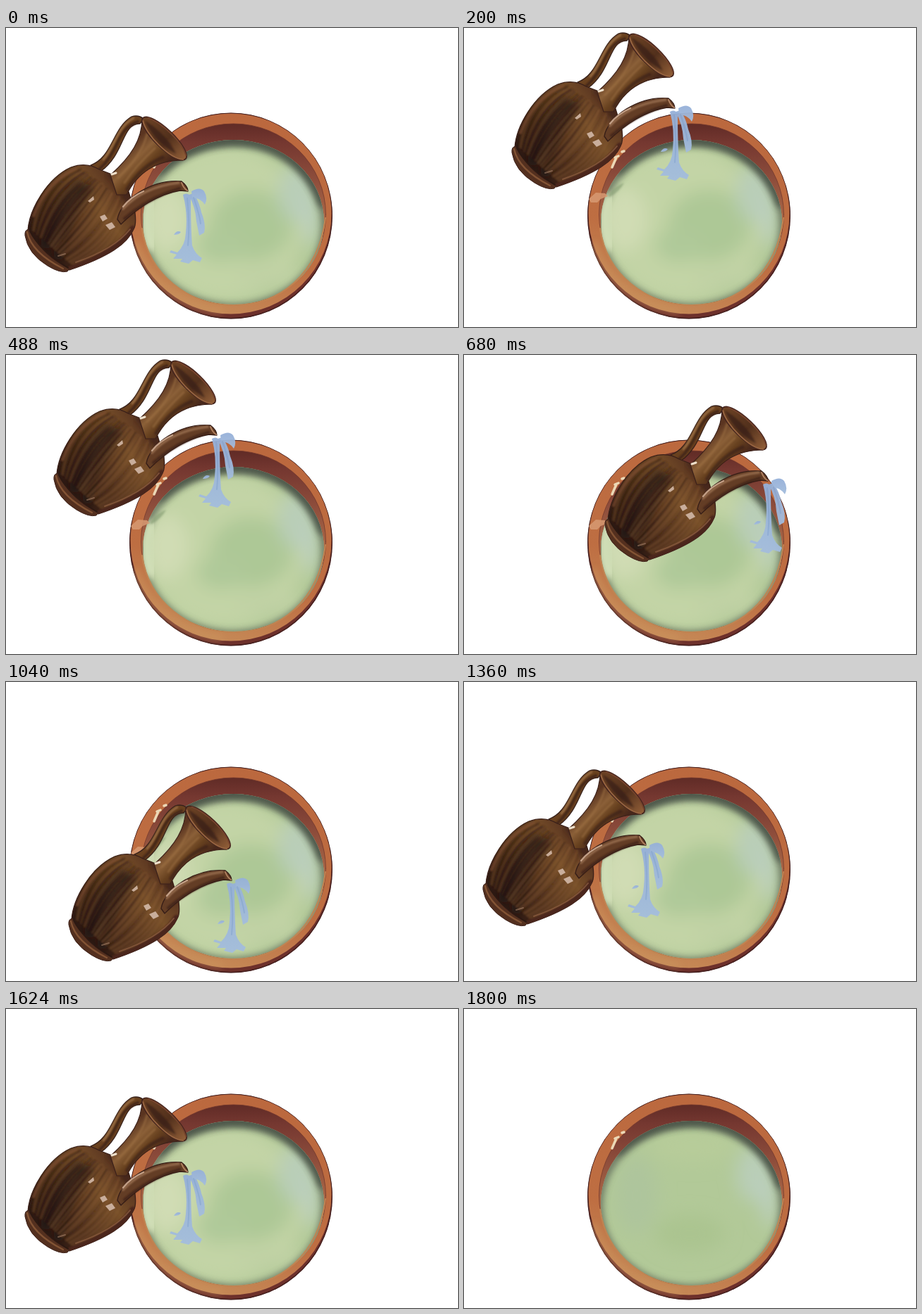
An HTML page that plays this animation: 641x425 px, repeating every 2.08 s.

```html
<!DOCTYPE html>
<html lang="en">
<head>
<meta charset="utf-8">
<title>Pouring jug</title>
<style>
  html, body { margin: 0; width: 100%; height: 100%; overflow: hidden; background: #fff; }
  svg { display: block; width: 641px; height: 425px; }
</style>
</head>
<body>
<svg viewBox="0 0 641 425" fill="none" stroke-linecap="round" stroke-linejoin="round">
  <defs>
    <filter id="soft" x="-50%" y="-50%" width="200%" height="200%"><feGaussianBlur stdDeviation="12"/></filter>
    <filter id="haze" x="-50%" y="-50%" width="200%" height="200%"><feGaussianBlur stdDeviation="5"/></filter>
    <filter id="smooth" x="-50%" y="-50%" width="200%" height="200%"><feGaussianBlur stdDeviation="1.2"/></filter>
    <linearGradient id="rim" x1=".65" y1="0" x2=".35" y2="1">
      <stop stop-color="#bb683e"/><stop offset=".65" stop-color="#be6e42"/><stop offset="1" stop-color="#c68b58"/>
    </linearGradient>
    <linearGradient id="wall" x1="0" y1="0" x2="0" y2="1">
      <stop stop-color="#602b26"/><stop offset=".1" stop-color="#743730"/><stop offset=".28" stop-color="#8a4a3a"/><stop offset=".55" stop-color="#ae6b48"/><stop offset="1" stop-color="#bc7d50"/>
    </linearGradient>
    <linearGradient id="glaze" gradientUnits="userSpaceOnUse" x1="45" y1="308" x2="165" y2="222">
      <stop stop-color="#2c1812"/><stop offset=".3" stop-color="#472a19"/><stop offset=".7" stop-color="#785029"/><stop offset="1" stop-color="#54301f"/>
    </linearGradient>
    <linearGradient id="neck" gradientUnits="userSpaceOnUse" x1="172" y1="172" x2="210" y2="210">
      <stop stop-color="#5a3420"/><stop offset=".35" stop-color="#8b6038"/><stop offset=".65" stop-color="#67411f"/><stop offset="1" stop-color="#47271b"/>
    </linearGradient>
    <linearGradient id="mouth" x1="0" y1="0" x2="1" y2="0">
      <stop stop-color="#6d4325"/><stop offset=".55" stop-color="#52301c"/><stop offset="1" stop-color="#936039"/>
    </linearGradient>
    <linearGradient id="water" x1="0" y1="0" x2="0" y2="1">
      <stop stop-color="#95b0d9"/><stop offset="1" stop-color="#a4bddd"/>
    </linearGradient>
    <clipPath id="bowlClip"><ellipse cx="319" cy="267" rx="144" ry="146.5"/></clipPath>
    <clipPath id="liquidClip"><ellipse cx="322.5" cy="276" rx="128.5" ry="117"/></clipPath>
    <path id="body" d="M31 288C33 257 59 213 92 198Q114 190 132 201L150 208L174 233L183 263Q185 279 181 286C172 307 146 325 90 344Q62 335 31 288Z"/>
    <clipPath id="bodyClip"><use href="#body"/></clipPath>
  </defs>

  <g clip-path="url(#bowlClip)">
    <ellipse cx="319" cy="267" rx="144" ry="146.5" fill="#6d302b" stroke="#45201f" stroke-width="3"/>
    <ellipse cx="319" cy="264" rx="142.5" ry="142.5" fill="url(#rim)"/>
    <ellipse cx="322.5" cy="265" rx="131" ry="129" fill="url(#wall)" stroke="#74392c" stroke-width=".8"/>
    <g clip-path="url(#liquidClip)">
      <rect x="190" y="155" width="270" height="245" fill="#b2c998"/>
      <g filter="url(#soft)">
        <g id="milky">
          <ellipse cx="310" cy="278" rx="114" ry="112" fill="#c3d4a6"/>
          <ellipse cx="226" cy="272" rx="34" ry="46" fill="#d0dcb4"/>
          <ellipse cx="348" cy="280" rx="58" ry="50" fill="#adc896"/>
          <ellipse cx="306" cy="309" rx="35" ry="24" fill="#afc999"/>
          <ellipse cx="374" cy="355" rx="50" ry="15" fill="#c0d1a4"/>
        </g>
        <g id="calm">
          <ellipse cx="245" cy="265" rx="30" ry="55" fill="#aec59c"/>
          <ellipse cx="325" cy="195" rx="62" ry="23" fill="#b7cc9a"/>
          <ellipse cx="320" cy="319" rx="50" ry="27" fill="#abc490"/>
        </g>
        <ellipse cx="412" cy="235" rx="26" ry="40" fill="#b9ceb8"/>
        <ellipse cx="432" cy="272" rx="9" ry="38" fill="#bdd0c4"/>
      </g>
      <ellipse cx="322" cy="280" rx="132" ry="119" stroke="#66715f" stroke-width="15" opacity=".85" filter="url(#haze)"/>
      <path d="M219 198C282 141 407 134 451 246" stroke="#414840" stroke-width="19" opacity=".75" filter="url(#haze)"/>
      <path id="paleEdge" d="M205 244Q193 275 206 308" stroke="#d1dfb7" stroke-width="17" filter="url(#haze)"/>
    </g>
    <path d="M193 285C202 350 258 394 323 394S443 350 453 270" stroke="#c18452" stroke-width="2"/>
    <path d="M184 308Q214 390 303 402" stroke="#cc9661" stroke-width="9" opacity=".55" filter="url(#haze)"/>
    <path d="M210 198L216 184M214 184L219 182M224 176L227 175" stroke="#ecd8b6" stroke-width="3.5"/>
    <g id="smudge">
      <path d="M177 243L187 234L200 235L204 239L194 243L189 248L180 248Z" fill="#d79b73" opacity=".85"/>
      <path d="M204 239Q211 226 227 220Q221 232 207 240Z" fill="#8aa178" opacity=".65" filter="url(#smooth)"/>
    </g>
  </g>

  <g id="jug">
    <g fill="url(#water)" opacity=".95">
      <path d="M251 237Q257 233 262 239Q262 283 264 309Q268 321 278 327L275 333L265 330L259 335L247 332L250 328L237 328L242 322L232 319L234 316L243 319Q254 309 255 291Q258 262 251 237Z"/>
      <path d="M259 237L266 235Q274 247 277 262Q284 279 281 291L274 295L270 275Q269 255 259 237Z"/>
      <path d="M263 232Q275 225 281 232Q287 242 282 251Q275 241 264 241Z"/>
      <path d="M238 294Q242 287 248 290Q246 294 238 294Z"/>
      <path d="M257 242Q261 281 258 309M266 241Q274 264 276 278" stroke="#7f9fd0" stroke-width="2" opacity=".5" fill="none"/>
    </g>

    <path d="M120 195C151 184 151 142 178 126Q188 123 195 129L190 136C164 135 169 179 134 204Z" fill="#69411f" stroke="#36201a" stroke-width="1.3"/>
    <path d="M132 201C161 176 155 145 187 133" stroke="#452719" stroke-width="4" filter="url(#smooth)"/>
    <path d="M138 187C155 168 158 140 181 128" stroke="#9c7147" stroke-width="2.5" filter="url(#smooth)"/>

    <use href="#body" fill="url(#glaze)" stroke="#3a2019" stroke-width="1.3"/>
    <g clip-path="url(#bodyClip)">
      <g id="grain" filter="url(#smooth)"></g>
      <path d="M92 343Q157 322 180 286" stroke="#4b271d" stroke-width="10" filter="url(#smooth)"/>
      <path d="M99 333Q154 314 176 286" stroke="#8b5d40" stroke-width="2" opacity=".75"/>
      <path d="M39 267Q57 218 99 200" stroke="#7e4e33" stroke-width="4" opacity=".65" filter="url(#smooth)"/>
      <path d="M150 207Q169 224 172 249" stroke="#351b14" stroke-width="13" opacity=".6" filter="url(#haze)"/>
    </g>

    <path d="M193 129C193 158 178 182 148 209L157 237L171 237C186 207 212 188 251 188Z" fill="url(#neck)" stroke="#3c211a" stroke-width="1.2"/>
    <path d="M200 151Q193 181 159 213M211 171Q184 196 168 220" stroke="#9c6f42" stroke-width="3" opacity=".55" filter="url(#smooth)"/>
    <path d="M222 184Q191 197 172 229" stroke="#361c15" stroke-width="5" opacity=".55" filter="url(#smooth)"/>
    <g transform="translate(224.5 157) rotate(44)">
      <ellipse rx="42" ry="13" fill="url(#mouth)" stroke="#44241d" stroke-width="1.8"/>
      <path d="M-38 1Q-5 -7 27 4Q-6 13 -38 1Z" fill="#341c14" opacity=".65" filter="url(#smooth)"/>
      <path d="M-39 3C-24 14 25 16 40 3" stroke="#986541" stroke-width="1.8"/>
      <path d="M-37 -5C-16 -14 22 -14 39 -4" stroke="#75432c" stroke-width="1.8"/>
    </g>
    <path d="M150 208L156 206" stroke="#eee0cc" stroke-width="3"/>

    <path d="M158 272C162 245 206 214 249 218Q258 225 258 232L247 231C216 236 186 256 163 279Z" fill="#633d25" stroke="#351d17" stroke-width="1.3"/>
    <path d="M168 271Q202 241 246 228" stroke="#3c2118" stroke-width="4" opacity=".75" filter="url(#smooth)"/>
    <path d="M166 257Q194 226 245 220" stroke="#916749" stroke-width="3.5" filter="url(#smooth)"/>
    <path d="M166 254Q177 240 195 232" stroke="#c3a087" stroke-width="2.3"/>
    <path d="M249 220Q252 228 257 231" stroke="#b08060" stroke-width="2"/>

    <path d="M32 286C44 310 65 331 90 342L87 346Q77 349 59 338Q31 321 27 295Q26 287 32 286Z" fill="#54301f" stroke="#3c2019" stroke-width="1"/>
    <path d="M30 290Q36 319 81 342" stroke="#925f3b" stroke-width="2.4" opacity=".75"/>
    <path d="M34 289Q47 315 88 341" stroke="#2c1912" stroke-width="1.7"/>

    <g fill="#c9ae9b">
      <path d="M133 268L140 265L144 271L137 275Z"/>
      <path d="M141 280L150 276L155 283L147 287Z"/>
      <path d="M116 246L124 239L125 244L119 248Z"/>
    </g>
    <path d="M74 324L84 321" stroke="#9b7860" stroke-width="2" opacity=".65"/>
  </g>
</svg>
<script>
  const byId = id => document.getElementById(id);
  const LOOP = 2080;
  const poses = [
    { at: 0, move: [0, 0] },
    { at: 200, move: [41, -118] },
    { at: 680, move: [173, -53] },
    { at: 1040, move: [62, 50] },
    { at: 1360, move: [0, 0] },
    { at: 1800, move: null }
  ];

  // Brush strokes fan from the base to the shoulder.
  function paintGrain() {
    let seed = 17;
    const random = () => (seed = (seed * 16807) % 2147483647) / 2147483647;
    const colors = ["#2a1811", "#3a2116", "#6f4726", "#8b5f35", "#633c21"];
    let strokes = '<path d="M57 306Q66 258 103 223M75 322Q84 270 118 230" stroke="#170e0b" stroke-width="16" opacity=".6" filter="url(#haze)"/>';
    for (let i = 0; i < 55; i++) {
      const side = i / 54;
      const shade = Math.floor(side * 2 + random() * 3);
      const start = `${37 + side * 59} ${286 + side * 52}`;
      const bend = `${46 + side * 112} ${215 + side * 102}`;
      const end = `${97 + side * 74 + random() * 5} ${197 + side * 53}`;
      const width = 1 + random() * 3;
      strokes += `<path d="M${start}Q${bend} ${end}" stroke="${colors[shade]}" stroke-width="${width}" opacity=".32"/>`;
    }
    byId("grain").innerHTML = strokes;
  }

  function show(element, visible) {
    element.style.display = visible ? "" : "none";
  }

  const jug = byId("jug");
  const pouringParts = ["milky", "paleEdge", "smudge"].map(byId);
  const calm = byId("calm");

  function draw() {
    const time = performance.now() % LOOP;
    const { move } = poses.findLast(pose => time >= pose.at);
    show(jug, move);
    show(calm, !move);
    pouringParts.forEach(part => show(part, move));
    if (move) jug.setAttribute("transform", `translate(${move})`);
    requestAnimationFrame(draw);
  }

  paintGrain();
  draw();
</script>
</body>
</html>
```
